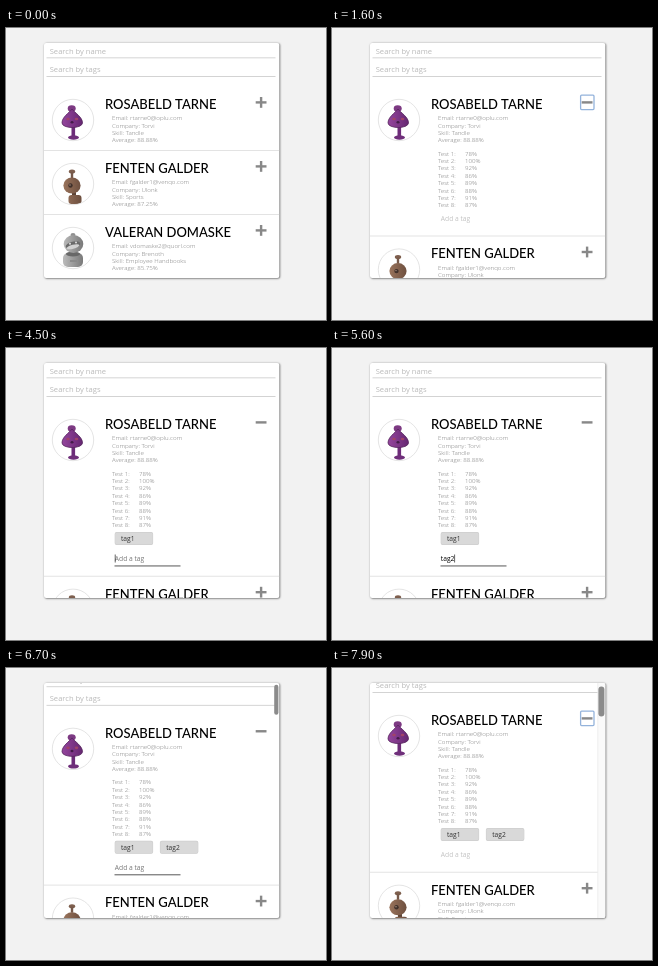
Animation, 320 px wide and 292 px high, one loop 8 s. Source, as an HTML page with a canvas:

```html
<!DOCTYPE html>
<html lang="en">
<head>
<meta charset="utf-8">
<title>Student list</title>
<style>
html, body { margin: 0; width: 100%; height: 100%; overflow: hidden; background: #f2f2f2; }
canvas { display: block; width: 320px; height: 292px; }
</style>
</head>
<body>
<canvas id="stage"></canvas>
<script>
const W = 320, H = 292, LOOP = 8000;
const canvas = document.getElementById('stage');
const ctx = canvas.getContext('2d');
const dpr = window.devicePixelRatio || 1;
canvas.width = W * dpr;
canvas.height = H * dpr;

const NAME = '500 13px Lato, "Open Sans", sans-serif';
const BODY = '300 6.2px "Open Sans", "Noto Sans", sans-serif';
const SEARCH = '7.6px "Open Sans", "Noto Sans", sans-serif';
const FIELD = '6.7px "Open Sans", "Noto Sans", sans-serif';
const CARD = { x: 38, y: 15, w: 235.4, h: 234.9 };
const LINE = 7.4;

const people = [
  { name: 'ROSABELD TARNE', email: 'rtarne0@oplu.com', company: 'Torvi', skill: 'Tandle', average: '88.88%', robot: purpleRobot },
  { name: 'FENTEN GALDER', email: 'fgalder1@venqo.com', company: 'Ulonk', skill: 'Sports', average: '87.25%', robot: brownRobot },
  { name: 'VALERAN DOMASKE', email: 'vdomaske2@quorl.com', company: 'Brenoth', skill: 'Employee Handbooks', average: '85.75%', robot: grayRobot }
];
const grades = [78, 100, 92, 86, 89, 88, 91, 87];

// Moments of the session, in ms
const OPEN = 1400, FOCUS = 2500, BLUR = 7900;
const TAGS = [4500, 6000];
const keys = [
  [FOCUS, ''], [3000, 't'], [3200, 'ta'], [3400, 'tag'], [4200, 'tag1'], [4500, ''],
  [4900, 't'], [5200, 'ta'], [5300, 'tag'], [5500, 'tag2'], [6000, '']
];
const scrollPath = [[6450, 0], [6600, 0.7], [6700, 11], [6800, 24]];

function along(path, t) {
  if (t <= path[0][0]) return path[0][1];
  for (let i = 1; i < path.length; i++) {
    const [t0, a] = path[i - 1], [t1, b] = path[i];
    if (t < t1) return a + (b - a) * (t - t0) / (t1 - t0);
  }
  return path[path.length - 1][1];
}

function text(str, x, y, font, color) {
  ctx.font = font;
  ctx.fillStyle = color;
  ctx.fillText(str, x, y);
}

function rect(x, y, w, h, color) {
  ctx.fillStyle = color;
  ctx.fillRect(x, y, w, h);
}

function round(x, y, w, h, r, color) {
  ctx.beginPath();
  ctx.roundRect(x, y, w, h, r);
  ctx.fillStyle = color;
  ctx.fill();
}

function oval(x, y, rx, ry, color, tilt = 0) {
  ctx.beginPath();
  ctx.ellipse(x, y, rx, ry, tilt, 0, Math.PI * 2);
  ctx.fillStyle = color;
  ctx.fill();
}

function shade(x0, x1, light, dark) {
  const g = ctx.createLinearGradient(x0, 0, x1, 0);
  g.addColorStop(0, light);
  g.addColorStop(1, dark);
  return g;
}

// Robots are drawn around the centre of their avatar circle
function purpleRobot() {
  const skin = shade(-10, 9, '#92449b', '#672873');
  rect(-1.5, 6, 3.6, 11, '#6d2c79');
  oval(0.5, 17.5, 5.5, 2.2, '#6f2f7a');
  oval(-1.3, -11.5, 4, 3.2, '#7d3a83');
  ctx.beginPath();
  ctx.moveTo(-1, -11);
  ctx.bezierCurveTo(2, -7, 9.5, -3, 9.5, 3);
  ctx.bezierCurveTo(9, 9, -10.5, 9, -11, 3);
  ctx.bezierCurveTo(-11, -3, -4, -7, -1, -11);
  ctx.fillStyle = skin;
  ctx.fill();
  ctx.strokeStyle = '#56265d';
  ctx.lineWidth = 0.8;
  ctx.stroke();
  oval(-5, -1, 1.8, 1.3, '#a04468');
  oval(3.5, -1, 1.8, 1.3, '#a04468');
  oval(-1, 2.2, 1.5, 1.2, '#431b48');
}

function brownRobot() {
  const skin = shade(-10, 9, '#9a745c', '#6b4d3d');
  oval(-1, -12.5, 3.2, 2, '#7e5f4e');
  rect(-2.2, -12, 2.4, 6, '#76594a');
  rect(-1, 8, 4, 4, '#5d4436');
  round(-4.5, 11, 13, 9, 3, skin);
  oval(-1, 1.5, 8.6, 8, skin);
  oval(-2.5, 1.5, 2.2, 2.2, '#40302a');
  oval(-3, 1, 0.7, 0.7, '#b49a88');
}

function grayRobot() {
  const skin = shade(-9, 11, '#b8b8b8', '#777');
  oval(0, -13, 2.5, 2, '#909090');
  round(-10, 5, 20, 14, 5, skin);
  oval(0, 6, 7, 2.5, '#686868');
  oval(0.5, -4, 9.8, 9, skin);
  oval(0, -3, 7.5, 3.4, '#6a6a6a', -0.25);
  oval(0, -1.3, 6.5, 2, '#d2d2d2', -0.25);
  oval(-3, -4.3, 1, 1, '#ddd');
  oval(3, -5.5, 1, 1, '#ddd');
  rect(-3, 12, 7, 2, '#8a8a8a');
}

function avatar(x, y, robot) {
  ctx.save();
  ctx.translate(x, y);
  oval(0, 0, 20.7, 20.7, '#fff');
  ctx.save();
  ctx.clip();
  robot();
  ctx.restore();
  ctx.beginPath();
  ctx.arc(0, 0, 20.7, 0, Math.PI * 2);
  ctx.strokeStyle = '#d8d8d8';
  ctx.lineWidth = 0.7;
  ctx.stroke();
  ctx.restore();
}

function toggle(y, open, focused) {
  if (focused) {
    ctx.strokeStyle = '#94b3db';
    ctx.lineWidth = 1.3;
    ctx.beginPath();
    ctx.roundRect(248.6, y - 7.2, 13.4, 14.4, 1);
    ctx.stroke();
  }
  rect(249.7, y - 1.2, 10.8, 2.4, '#888');
  if (!open) rect(253.9, y - 5.4, 2.4, 10.8, '#888');
}

function person(p, top, open, focused) {
  avatar(67, top + 34, p.robot);
  text(p.name, 99, top + 22.8, NAME, '#000');
  const lines = ['Email: ' + p.email, 'Company: ' + p.company, 'Skill: ' + p.skill, 'Average: ' + p.average];
  lines.forEach((s, i) => text(s, 106, top + 34.2 + i * LINE, BODY, '#7c7c7c'));
  toggle(top + 16.4, open, focused);
}

function details(top, t, tagCount) {
  grades.forEach((g, i) => {
    const y = top + 69.6 + i * LINE;
    text(`Test ${i + 1}:`, 106, y, BODY, '#7c7c7c');
    text(g + '%', 133, y, BODY, '#7c7c7c');
  });
  for (let i = 0; i < tagCount; i++) {
    const x = 108.7 + i * 45.2;
    round(x, top + 126, 38.4, 13, 2, '#c9c9c9');
    round(x + 0.4, top + 126.4, 37.6, 12.2, 1.8, '#d9d9d9');
    text('tag' + (i + 1), x + 6.3, top + 134.7, FIELD, '#333');
  }
  tagField(top + (tagCount ? 20.2 : 0), t);
}

function tagField(top, t) {
  const focused = t >= FOCUS && t < BLUR;
  const key = keys.filter(k => k[0] <= t).pop();
  const value = key ? key[1] : '';
  const base = top + 134.8;
  if (value) text(value, 108.8, base, FIELD, '#000');
  else text('Add a tag', 108.8, base, FIELD, focused ? '#777' : '#c2c2c2');
  if (!focused) return;
  rect(108.5, top + 139.3, 66, 0.9, '#444');
  if ((t - key[0]) % 1000 < 500) {
    ctx.font = FIELD;
    rect(108.8 + ctx.measureText(value).width, top + 128.3, 0.7, 8, '#222');
  }
}

function search(label, base) {
  text(label, 43.7, base, SEARCH, '#b9b9b9');
  rect(40.5, base + 3.8, 229, 0.9, '#cfcfcf');
}

function scrollbar(t, scroll) {
  if (t < 6700) return;
  const grow = along([[7250, 0], [7500, 1]], t);
  if (grow > 0) {
    ctx.globalAlpha = grow;
    rect(265.6, 15, 8, 235, '#fafafa');
    rect(265.6, 15, 0.6, 235, '#e4e4e4');
    ctx.globalAlpha = 1;
  }
  const w = 4.2 + grow * 1.8;
  round(272.4 - w, 15.5 + scroll * 0.12, w, 30, w / 2, '#8b8b8b');
}

function draw(t) {
  ctx.setTransform(dpr, 0, 0, dpr, 0, 0);
  rect(0, 0, W, H, '#f2f2f2');

  ctx.save();
  ctx.shadowColor = 'rgba(0,0,0,.65)';
  ctx.shadowBlur = 2 * dpr;
  ctx.shadowOffsetX = ctx.shadowOffsetY = 0.6 * dpr;
  round(CARD.x, CARD.y, CARD.w, CARD.h, 2, '#fff');
  ctx.restore();

  ctx.save();
  ctx.beginPath();
  ctx.roundRect(CARD.x, CARD.y, CARD.w, CARD.h, 2);
  ctx.clip();

  const open = t >= OPEN;
  const tagCount = TAGS.filter(at => at <= t).length;
  const scroll = along(scrollPath, t);
  const extra = open ? 85.6 + (tagCount ? 20.2 : 0) : 0;
  const ring = open && t < FOCUS || t >= BLUR;

  ctx.save();
  ctx.translate(0, -scroll);
  search('Search by name', 25.6);
  search('Search by tags', 44.2);
  people.forEach((p, i) => {
    const top = 58 + i * 64 + (i ? extra : 0);
    person(p, top, open && !i, ring && !i);
    if (open && !i) details(top, t, tagCount);
    rect(CARD.x, 122 + i * 64 + extra, CARD.w, 0.8, '#dcdcdc');
  });
  ctx.restore();

  scrollbar(t, scroll);
  ctx.restore();
}

const start = performance.now();
function tick() {
  draw((performance.now() - start) % LOOP);
  requestAnimationFrame(tick);
}
tick();
</script>
</body>
</html>
```
